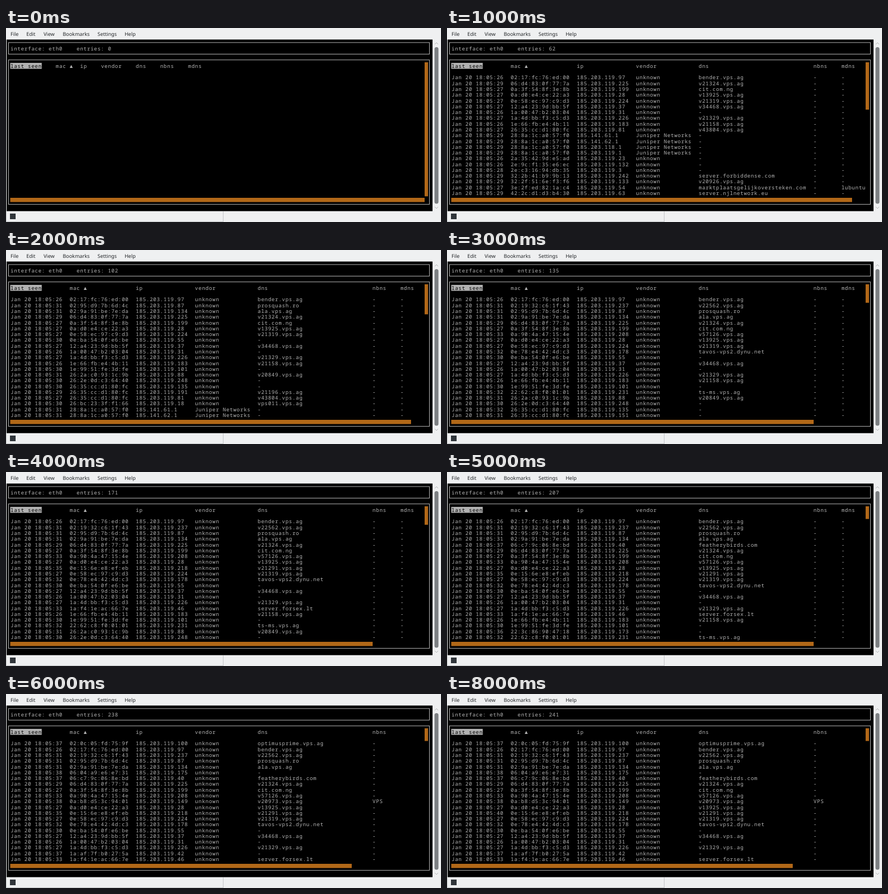
Write an HTML page with a canvas that moves like this. It is 770x345 px and loops after 9000 ms.

```html
<!DOCTYPE html>
<html lang="en">
<head>
<meta charset="utf-8">
<title>Network scan</title>
<style>
html, body { margin: 0; width: 100%; height: 100%; overflow: hidden; background: #eff0f1; }
canvas { display: block; width: 770px; height: 345px; }
</style>
</head>
<body>
<canvas id="stage" width="770" height="345"></canvas>
<script>
const ctx = document.getElementById('stage').getContext('2d');
const STEP = 1000, STEPS = 9, VISIBLE = 21;
const COL = 6.162, ROW = 10.275, LEFT = 8, SIZE = 9.15;
const GREY = '#b2b2b2', ORANGE = '#b26818', PANEL = '#eff0f1', LINE = '#c3c5c7';
const MONO = SIZE + 'px "Noto Sans Mono", monospace';
const SANS = '8.95px "Noto Sans", sans-serif';

// first step | mac | ip | dns | second last seen (step:second for later updates)
const HOSTS = `
6 02:0c:05:fd:75:9f 119.100 optimusprime.vps.ag 37
1 02:17:fc:76:ed:00 119.97 bender.vps.ag 26
3 02:19:32:c6:1f:43 119.237 v22562.vps.ag 31
2 02:95:d9:7b:6d:4c 119.87 prosquash.ro 31
2 02:9a:91:be:7e:da 119.134 ala.vps.ag 31
6 06:04:a9:e6:e7:31 119.175 - 38
5 06:c7:9c:06:8e:bd 119.40 featherybirds.com 37
1 06:d4:83:0f:77:7a 119.225 v21324.vps.ag 29
1 0a:3f:54:8f:3e:8b 119.199 cit.com.ng 27
3 0a:90:4a:47:15:4e 119.208 v57126.vps.ag 33
6 0a:b8:d5:3c:94:01 119.149 v20973.vps.ag 38
1 0a:d0:e4:ce:22:a3 119.28 v13925.vps.ag 27
4 0e:15:6e:e8:ef:eb 119.218 v21291.vps.ag 35 7:40
1 0e:58:ec:97:c9:d3 119.224 v21319.vps.ag 27
3 0e:78:e4:42:4d:c3 119.178 tavos-vps2.dynu.net 32
2 0e:ba:54:0f:e6:be 119.55 - 30
1 12:a4:23:9d:bb:5f 119.37 v34468.vps.ag 27
1 1a:00:47:b2:03:04 119.31 - 26
1 1a:4d:bb:f3:c5:d3 119.226 v21329.vps.ag 27
6 1a:af:7f:b0:27:5a 119.42 - 37
4 1a:f4:1e:ac:66:7e 119.46 server.forsex.lt 33
1 1e:66:fb:e4:4b:11 119.183 v21158.vps.ag 26
2 1e:99:51:fe:3d:fe 119.101 - 30
5 22:3c:86:90:47:18 119.173 - 36
3 22:62:c8:f0:01:01 119.231 ts-ms.vps.ag 32
2 26:2a:c0:93:1c:9b 119.88 v20849.vps.ag 31
2 26:2e:0d:c3:64:40 119.248 - 30
2 26:35:cc:d1:80:fc 119.135 - 30 3:32
3 26:35:cc:d1:80:fc 119.151 - 31
2 26:35:cc:d1:80:fc 119.191 v21196.vps.ag 29
1 26:35:cc:d1:80:fc 119.81 v43804.vps.ag 27
2 26:bc:23:3f:f1:66 119.18 vps011.vps.ag 30
1 28:8a:1c:a0:57:f0 185.141.61.1 - 29 2:31
1 28:8a:1c:a0:57:f0 185.141.62.1 - 29 2:31
1 28:8a:1c:a0:57:f0 118.1 - 29
1 28:8a:1c:a0:57:f0 119.1 - 29
1 2a:35:42:9d:e5:ad 119.23 - 26
1 2e:9c:f1:35:e6:ec 119.132 - 26
1 2e:c3:16:94:db:35 119.3 - 28
1 32:2b:41:b9:9b:13 119.242 server.forbiddense.com 29
1 32:2f:51:6e:f3:f6 119.133 v20926.vps.ag 29
1 3e:2f:ed:82:1a:c4 119.54 marktplaatsgelijkoversteken.com 27
1 42:2c:d1:d3:b4:30 119.63 server.njlnetwork.eu 29`.trim().split('\n').map(line => {
  const [from, mac, ip, dns, seen, update] = line.split(' ');
  const [at, later] = (update || '99:').split(':');
  return {
    from: +from, mac, dns, seen, at: +at, later,
    ip: ip.startsWith('185') ? ip : '185.203.' + ip,
    vendor: mac.startsWith('28:8a') ? 'Juniper Networks' : 'unknown',
    nbns: dns.startsWith('v20973') ? 'VPS' : '-',
    mdns: dns.startsWith('markt') ? 'lubuntu' : '-'
  };
});

const ENTRIES = [0, 62, 102, 135, 171, 207, 238, 240, 241];
const THUMB_ROWS = [23, 8, 5, 3, 3, 2, 2, 2, 2];
const TRACK_END = [741, 717, 717, 649, 649, 649, 612, 612, 612];
const NAMES = ['mac', 'ip', 'vendor', 'dns', 'nbns', 'mdns'];
const NARROW = [13, 20, 26, 36, 43, 51];
const WIDE = [17, 36, 53, 71, 104, 112];

function box(x, y, w, h, color) {
  ctx.fillStyle = color;
  ctx.fillRect(x, y, w, h);
}

// Text on the terminal's character grid
function put(text, col, row, color = GREY) {
  ctx.font = MONO;
  ctx.letterSpacing = (COL - SIZE * .6) + 'px';
  ctx.fillStyle = color;
  ctx.fillText(text, LEFT + col * COL, 40.1 + (row - 1) * ROW);
}

// Border running through the middle of the given rows
function frame(top, bottom) {
  ctx.strokeStyle = GREY;
  ctx.lineWidth = 1;
  ctx.strokeRect(4.5, 25.9 + top * ROW, 745, (bottom - top) * ROW);
}

function arrow(y, dir) {
  ctx.strokeStyle = '#a4a7a9';
  ctx.lineWidth = .8;
  ctx.beginPath();
  ctx.moveTo(759, y + 1.5 * dir);
  ctx.lineTo(762, y - 1.5 * dir);
  ctx.lineTo(765, y + 1.5 * dir);
  ctx.stroke();
}

function drawWindow() {
  box(0, 0, 770, 345, PANEL);
  ctx.font = SANS;
  ctx.letterSpacing = '0px';
  ctx.fillStyle = '#232629';
  const menu = { File: 8, Edit: 36, View: 66.5, Bookmarks: 100.5, Settings: 162, Help: 210 };
  for (const name in menu) ctx.fillText(name, menu[name], 13.8);

  box(1, 20.5, 754, 305.2, '#000');
  ctx.fillStyle = '#7c7f82';
  ctx.beginPath();
  ctx.roundRect(758.5, 34, 7, 278.5, 3.5);
  ctx.fill();
  arrow(27.5, 1);
  arrow(319.5, -1);

  box(384, 326, 1, 19, LINE);
  box(1, 344, 384, 1, LINE);
  box(0, 326, 1, 19, LINE);
  box(7, 330, 10, 10, '#31363b');
}

function drawTable(step) {
  const cols = step ? WIDE : NARROW;
  box(7.5, 62, 55.8, 10.6, GREY);
  put('last seen', 0, 4, '#000');
  const shown = NAMES.slice(0, step < 6 ? 6 : 5);
  shown.forEach((name, i) => put(name, cols[i], 4));
  put('▲', cols[0] + 4, 4);

  HOSTS.filter(h => h.from <= step).slice(0, VISIBLE).forEach((h, i) => {
    const row = 6 + i;
    put('Jan 20 18:05:' + (step >= h.at ? h.later : h.seen), 0, row);
    shown.forEach((name, k) => put(h[name], cols[k], row));
  });
}

function draw(step) {
  drawWindow();
  frame(0, 2);
  frame(3, 28);
  put('interface: eth0', 0, 1);
  put('entries: ' + ENTRIES[step], 19, 1);
  drawTable(step);
  box(741, 61, 6, 2 + THUMB_ROWS[step] * ROW, ORANGE);
  box(7.5, 302, TRACK_END[step] - 7.5, 7.5, ORANGE);
}

ctx.textRendering = 'geometricPrecision';
const start = performance.now();
function tick(now) {
  draw(Math.floor(Math.max(0, now - start) / STEP) % STEPS);
  requestAnimationFrame(tick);
}
draw(0);
requestAnimationFrame(tick);
</script>
</body>
</html>
```
